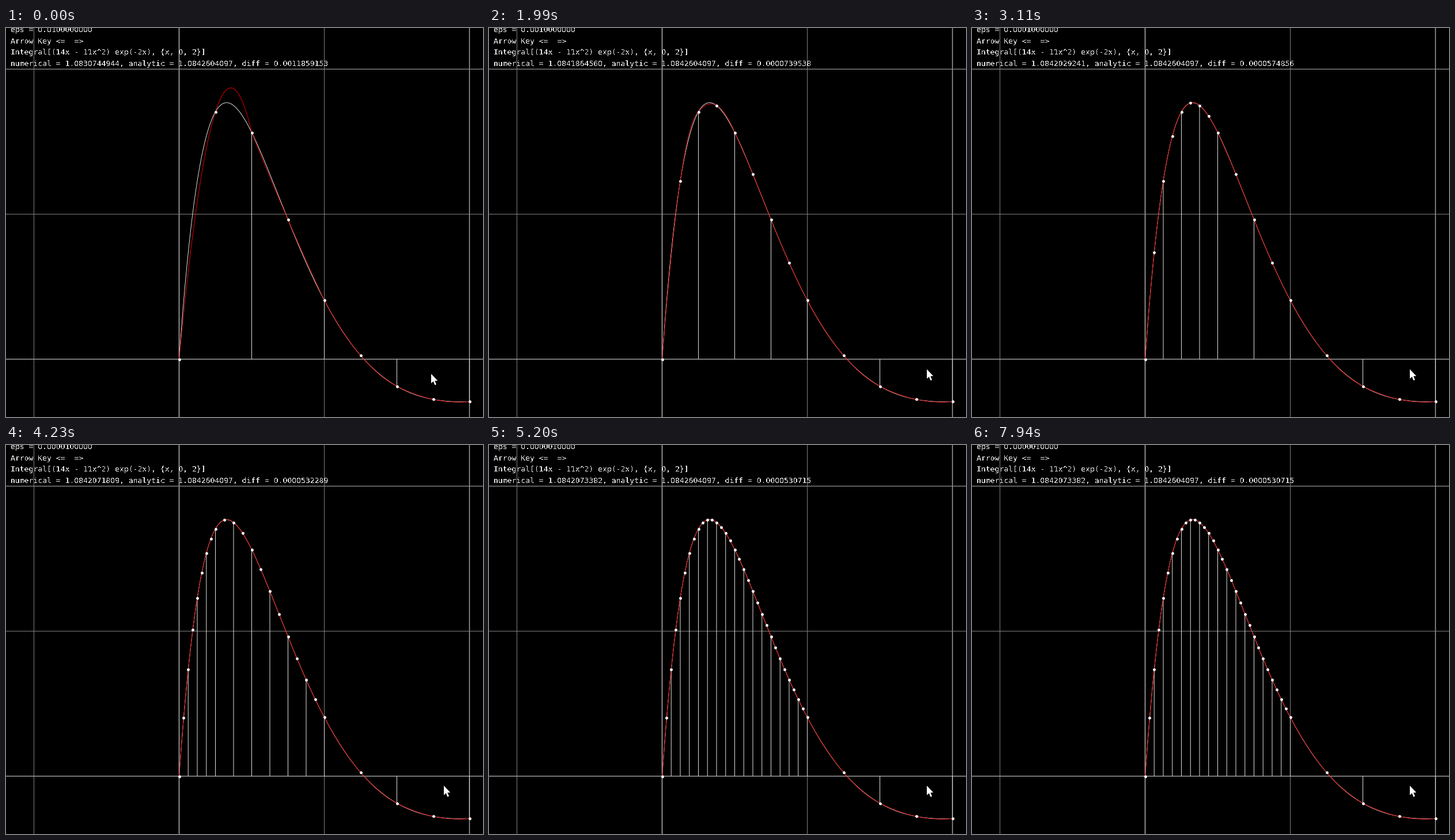
Write a matplotlib script that moves like this. It is 828 px wide and 676 px high and loops after 8000 ms.

```python
import math

import numpy as np
import matplotlib.pyplot as plt
from matplotlib.animation import FuncAnimation
from matplotlib.patches import Polygon

WIDTH, HEIGHT, DPI = 828, 676, 64
PX = 72 / DPI                       # points per pixel
UNIT, X0, Y0 = 252, 300.5, 575.5    # plot scale and origin in pixels
LOOP, STEP = 8000, 20               # ms

# (start ms, exponent of the tolerance)
TOLERANCES = [(0, 2), (1990, 3), (3110, 4), (4230, 5),
              (5200, 6), (5940, 7), (7940, 6)]
# (start ms, cursor tip)
CURSOR_STOPS = [(0, (738, 601)), (1000, (751, 597)), (1120, (760, 593)),
                (3230, (760, 592))]
ARROW = np.array([(0, 0), (0, 16.5), (3.8, 13), (6.4, 19.5),
                  (9, 18.4), (6.3, 12.2), (11.2, 11.8)])


def f(x):
    return (14 * x - 11 * x**2) * np.exp(-2 * x)


def to_px(x, y):
    return X0 + UNIT * np.asarray(x), Y0 - UNIT * np.asarray(y)


def simpson(a, b):
    return (b - a) / 6 * (f(a) + 4 * f((a + b) / 2) + f(b))


def integrate(a, b, eps):
    """Adaptive Simpson rule: the value and the accepted panels."""
    m = (a + b) / 2
    halves = simpson(a, m) + simpson(m, b)
    error = halves - simpson(a, b)
    if abs(error) < 15 * eps:
        return halves + error / 15, [(a, m), (m, b)]
    left, left_panels = integrate(a, m, eps)
    right, right_panels = integrate(m, b, eps)
    return left + right, left_panels + right_panels


def parabola(a, b):
    t = np.linspace(0, 1, 40)
    y = (f(a) * (1 - t) * (1 - 2 * t) + 4 * f((a + b) / 2) * t * (1 - t)
         + f(b) * t * (2 * t - 1))
    return a + (b - a) * t, y


ANALYTIC = (14 * (1 - 5 * math.exp(-4)) - 11 * (1 - 13 * math.exp(-4))) / 4


def build_state(exponent):
    eps = 10.0**-exponent
    value, panels = integrate(0.0, 2.0, eps)
    pieces = [parabola(a, b) for a, b in panels]
    nodes = np.array([0.0] + [x for a, b in panels for x in ((a + b) / 2, b)])
    ends = np.array([b for _, b in panels])
    bars_x = np.column_stack([ends, ends, ends]).ravel()
    bars_y = np.column_stack([0 * ends, f(ends), np.nan * ends]).ravel()
    return {
        "fit": to_px(np.concatenate([p[0] for p in pieces]),
                     np.concatenate([p[1] for p in pieces])),
        "dots": np.column_stack(to_px(nodes, f(nodes))),
        "bars": to_px(bars_x, bars_y),
        "eps": f"eps = {eps:.10f}",
        "result": f"numerical = {value:.10f}, analytic = {ANALYTIC:.10f}, "
                  f"diff = {abs(value - ANALYTIC):.10f}",
    }


STATES = {n: build_state(n) for n in range(2, 8)}


def current(schedule, now):
    return [value for start, value in schedule if start <= now][-1]


fig = plt.figure(figsize=(WIDTH / DPI, HEIGHT / DPI), dpi=DPI,
                 facecolor="black")
ax = fig.add_axes([0, 0, 1, 1])
ax.set_xlim(0, WIDTH)
ax.set_ylim(HEIGHT, 0)
ax.axis("off")


def line(xs, ys, color, width=1.0, z=2):
    # no snapping: it would push half-pixel positions to the next pixel
    return ax.plot(xs, ys, color=color, lw=width * PX, zorder=z, snap=False,
                   solid_capstyle="butt")[0]


def plain(text):
    # the capital O stands in for a zero without an inner dot
    return text.replace("0", "O")


def label(baseline, text=""):
    return ax.text(8, baseline, plain(text), color="#e4e4e4",
                   family="DejaVu Sans Mono", fontsize=13.07 * PX,
                   va="baseline", ha="left", zorder=8, antialiased=False,
                   parse_math=False)


for k, (color, width) in zip(range(-1, 3), [("#808080", 1), ("#b4b4b4", 1.5),
                                            ("#808080", 1), ("#a0a0a0", 1.5)]):
    x = X0 + k * UNIT
    line([x, x], [0, HEIGHT], color, width, 1)
for k, (color, width) in enumerate([("#b4b4b4", 1.3), ("#808080", 1),
                                    ("#909090", 1.3)]):
    y = Y0 - k * UNIT
    line([0, WIDTH], [y, y], color, width, 1)

bars = line([], [], "#e0e0e0", z=2)
curve_x = np.linspace(0, 2, 600)
line(*to_px(curve_x, f(curve_x)), "white", 0.85, z=3)
fit = line([], [], "#f00000", 0.9, z=4)
dots = ax.scatter([], [], s=(4.9 * PX)**2, color="white", lw=0, zorder=5)

eps_label = label(7)
label(27, "Arrow Key <=  =>")
label(46, "Integral[(14x - 11x^2) exp(-2x), {x, 0, 2}]")
result_label = label(66)

cursor = Polygon(ARROW, closed=True, facecolor="white", lw=0, zorder=9)
ax.add_patch(cursor)


def update(frame):
    now = frame * STEP + STEP / 2
    state = STATES[current(TOLERANCES, now)]
    bars.set_data(*state["bars"])
    fit.set_data(*state["fit"])
    dots.set_offsets(state["dots"])
    eps_label.set_text(plain(state["eps"]))
    result_label.set_text(plain(state["result"]))
    cursor.set_xy(ARROW + current(CURSOR_STOPS, now))
    return bars, fit, dots, eps_label, result_label, cursor


anim = FuncAnimation(fig, update, frames=LOOP // STEP, interval=STEP,
                     init_func=lambda: update(0), repeat=True, repeat_delay=0)
plt.show()
```
